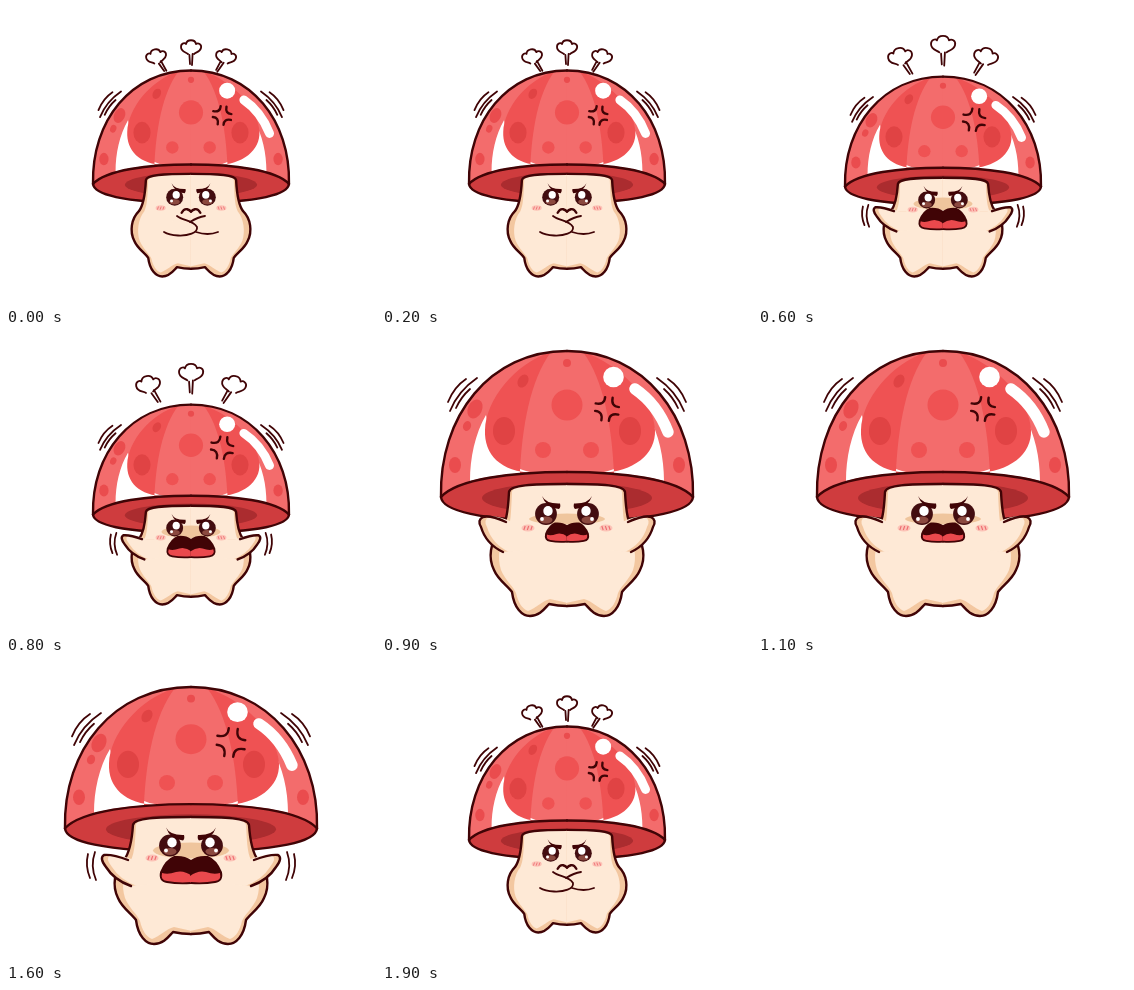
These frames come from a looping animation (370x300 px, 2000 ms). An HTML page:

```html
<!DOCTYPE html>
<html lang="en">
<head>
<meta charset="utf-8">
<title>Angry mushroom</title>
<style>
html, body { margin: 0; width: 100%; height: 100%; overflow: hidden; background: #fff; }
svg { display: block; width: 100vw; height: 100vh; }
.ln { fill: none; stroke: #400406; stroke-width: 2.4; stroke-linecap: round; stroke-linejoin: round; vector-effect: non-scaling-stroke; }
.thin { stroke-width: 1.8; }
</style>
</head>
<body>
<svg id="stage" viewBox="0 0 370 300"></svg>
<script>
const stage = document.getElementById('stage');
const SKIN = '#fee9d6', TAN = '#f3c7a0', DARK = '#400406';

// One pose per 100 ms: A/B sulk, d/e small shout, D/E big shout; B, e, E are squashed.
const POSES = 'ABAABdedeDEDEDEDEEEA';

const fill = (d, c) => `<path d="${d}" fill="${c}"/>`;
const line = (d, c = '') => `<path class="ln ${c}" d="${d}"/>`;
const oval = (x, y, rx, ry, c, turn = 0) =>
  `<ellipse cx="${x}" cy="${y}" rx="${rx}" ry="${ry}" fill="${c}" transform="rotate(${turn} ${x} ${y})"/>`;
const group = (t, s) => `<g transform="${t}">${s}</g>`;
const both = s => s + group('matrix(-1 0 0 1 370 0)', s);

function cap() {
  const edge = 'M59 163C57 82 108 17 185 17';
  const rim = 'C75 145 130 138 185 138';
  const brim = 'M59 163C60 176 95 187 185 187';
  const white = 'M104 81C93 100 88 124 88 147Q118 139 154 139Q112 134 104 81Z';
  const panel = x => `M169 18C132 30 ${x + 1} 66 ${x} 96C${x - 1} 120 118 138 152 139` +
    'L138 139C140 94 148 46 169 18Z';
  return both(fill(brim + 'L186 187L186 138L185 138C130 138 75 145 59 163Z', '#cf3c3e')) +
    oval(185, 164, 85, 15.5, '#ab2c2f') +
    both(line(brim) + fill('M186 17L185 17C108 17 57 82 59 163' + rim + 'L186 138Z', '#f36c6c') +
      fill(white, '#fff')) +
    fill(panel(103), '#ef5253') +
    group('matrix(-1 0 0 1 370 0)', fill(panel(97), '#ef5253')) +
    both(
      oval(122, 97, 11, 14, '#e04344') +
      oval(161, 116, 8, 8, '#ef5253') +
      oval(73, 131, 6, 8, '#ea4c4e')
    ) +
    oval(185, 71, 15.5, 15.5, '#ef5253') +
    oval(185, 29, 4, 4, '#ea4c4e') +
    oval(141, 47, 5, 7, '#e04344', 30) +
    oval(93, 75, 7, 10, '#ea4c4e', 25) +
    oval(85, 92, 4, 5, '#ea4c4e', 20) +
    oval(231.5, 43, 10.3, 10.3, '#fff') +
    '<path d="M253 55Q275 70 286 98" fill="none" stroke="#fff" stroke-width="11.5" stroke-linecap="round"/>' +
    both(
      line(edge) + line('M59 163' + rim) +
      line('M66 68Q72 53 84 45', 'thin') +
      line('M68 77Q76 57 95 44', 'thin') +
      line('M74 74Q79 63 88 55', 'thin')
    );
}

function body(low) {
  const y = low ? 155 : 150;
  const half = `M185 ${y}C150 ${y} 128 ${y + 1} 127 ${y + 8}C126 178 124 190 118 198` +
    'C108 208 106 224 112 236C116 246 126 252 130 258C132 274 140 282 148 282' +
    'C158 282 163 274 167 270Q176 272 185 272';
  const light = `M186 ${y}L185 ${y}C150 ${y} 131 ${y + 1} 130 ${y + 8}C129 178 129 190 125 198` +
    'C117 208 115 224 119 236C123 246 131 252 134 259C136 268 140 275 146 277' +
    'C154 274 160 267 168 265L186 269Z';
  return both(fill(half + `L186 272L186 ${y}Z`, TAN) + fill(light, SKIN) + line(half));
}

function arms(low) {
  const d = low
    ? 'M122 198Q106 192 98 193Q93 196 100 205Q108 218 125 224'
    : 'M124 188Q108 181 101 183Q95 186 99 193Q104 210 121 218';
  const shape = d + (low ? 'L138 222L138 198Z' : 'L136 216L136 188Z');
  const shake = low
    ? line('M82 192Q79 204 84 216', 'thin') + line('M89 190Q84 204 90 218', 'thin')
    : '';
  return both(fill(shape, TAN) + group('translate(6 0)', fill(shape, SKIN)) + line(d) + shake);
}

function mouth(low) {
  const top = 'M185 199Q178 194 168 195Q160 198 155 210';
  const under = 'Q153 219 161 220Q172 222 185 221';
  const s = both(
    fill(top + under + 'L186 221L186 199Z', DARK) +
    fill('M186 214Q178 208 170 210Q162 213 156 211' + under + 'L186 221Z', '#ea494d') +
    line(top + under, 'thin')
  );
  return low ? s : group('translate(185 198.5) scale(.7) translate(-185 -208)', s);
}

function face(low, shout) {
  const eye = oval(164, 180, 10.9, 10.9, '#430d10') +
    oval(164, 186, 6.5, 3.4, '#8b493f') +
    oval(166, 177, 4.7, 5, '#fff') +
    oval(160, 185, 1.9, 1.9, '#fff');
  const brow = 'M160 162Q164 170 178 169.5Q179 173 177 175Q164 174 160 162Z';
  const cheek = oval(146, 194, 6.5, 3.6, '#fcc3b7') +
    [142.5, 146, 149.5].map(x =>
      `<path d="M${x + .7} 192L${x - .7} 196" stroke="#ee6b70" stroke-width="1.1"/>`).join('');
  const pout = low
    ? line('M175 199Q185 193 195 199')
    : both(line('M173 200Q176 194.5 180 195.5Q183 196.5 185 198.5'));
  return group(`translate(0 ${low ? 3.5 : 0})`,
      (shout ? oval(185, 185, 38, low ? 8 : 5.5, '#efc59d') : '') +
      both(eye + fill(brow, DARK))) +
    group(`translate(0 ${low ? 2 : 0})`, both(cheek)) +
    (shout ? mouth(low) : pout);
}

function anger(low) {
  const corner = line('M-3.5 -11.5Q-3 -3.5 -12 -4');
  const s = [0, 90, 180, 270].map(a => group(`rotate(${a})`, corner)).join('');
  return group(`translate(225 ${low ? 80.5 : 75}) rotate(8) scale(${low ? 1.2 : 1})`, s);
}

function folded(low) {
  const d = 'M171 210C177 215 187 214 191 221C192 227 182 230 172 229.5Q163 229 158 226';
  return group(`translate(0 ${low ? -1 : 0})`,
    fill(d + 'Z', SKIN) + line(d, 'thin') +
    line('M199 210Q192 211 184 216', 'thin') +
    line('M190 226Q202 230 212 226', 'thin'));
}

function puffs(low) {
  const cloud = line('M-3 7C-5 5 -10 5 -10 0C-10 -4 -6 -4.5 -5 -3C-4 -8 4 -8 5 -3' +
    'C7 -4.5 11 -3 10 1C9 5 5 5 3 7', 'thin');
  const tail = line('M-1.6 8L-1 17M1.6 7L1 18', 'thin');
  const at = (x, y, a) => group(`translate(${x} ${y}) scale(${low ? 1.2 : 1})`,
    group(`rotate(${a / 3})`, cloud) + group(`rotate(${a})`, tail));
  return low
    ? at(142, 50, -32) + at(185, 38, 0) + at(228, 50, 32)
    : at(150, 50, -32) + at(185, 41, 0) + at(220, 50, 32);
}

function scene(pose) {
  const low = 'BeE'.includes(pose), big = 'DE'.includes(pose), shout = !'AB'.includes(pose);
  const figure = group(low ? 'matrix(1 0 0 .968 0 8.5)' : '', cap()) + anger(low) +
    body(low) + (shout ? arms(low) : '') + face(low, shout);
  if (big) return figure;
  return group('translate(185 270.5) scale(.7776) translate(-185 -282)', figure) +
    (shout ? '' : folded(low)) + puffs(low);
}

let shown = '';
const start = performance.now();
function tick(now) {
  const pose = POSES[Math.floor(Math.max(0, now - start) / 100) % POSES.length];
  if (pose !== shown) stage.innerHTML = scene(shown = pose);
  requestAnimationFrame(tick);
}
tick(start);
</script>
</body>
</html>
```
